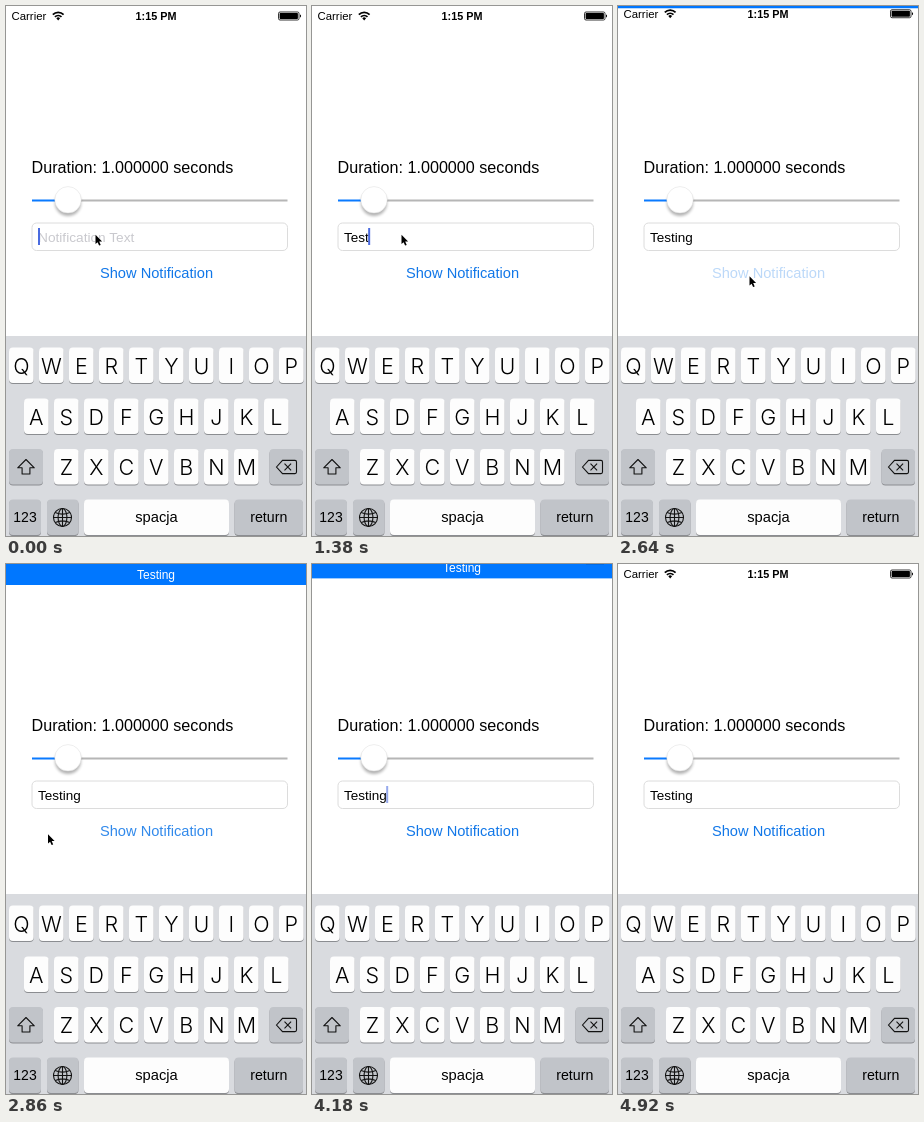
Write an HTML page that moves like this. It is 300 px wide and 530 px high and loops after 5020 ms.

```html
<!DOCTYPE html>
<html lang="en">
<head>
<meta charset="utf-8">
<title>Status bar notification</title>
<style>
  html, body { margin: 0; width: 100%; height: 100%; overflow: hidden; background: #fff; }
  svg { display: block; width: 300px; height: 530px; }
  text { font-family: "Liberation Sans", Arial, sans-serif; }
  .mid { text-anchor: middle; }
  .letter { font: 300 21.5px Inter, "Liberation Sans", sans-serif; }
  .line { fill: none; stroke: #111; stroke-width: 1.1; }
</style>
</head>
<body>
<svg viewBox="0 0 300 530">
  <defs>
    <filter id="soft" x="-50%" y="-50%" width="200%" height="200%"><feGaussianBlur stdDeviation="1.8"/></filter>
  </defs>

  <g id="banner">
    <rect width="300" height="21" fill="#0077ff"/>
    <text class="mid" x="150" y="15" font-size="12" fill="#fff">Testing</text>
  </g>

  <g id="status">
    <text x="5.5" y="14" font-size="11.4">Carrier</text>
    <g fill="none" stroke="#000" stroke-width="1.7">
      <path d="M46.8 8.6a7.6 7.6 0 0 1 10.8 0"/>
      <path d="M48.9 10.9a4.7 4.7 0 0 1 6.6 0"/>
    </g>
    <path d="M50.3 12.3a2.7 2.7 0 0 1 3.8 0L52.2 14.4z"/>
    <text class="mid" x="150" y="14" font-size="10.8" font-weight="700">1:15 PM</text>
    <rect x="272.5" y="6" width="20.5" height="8" rx="1.5" fill="none" stroke="#000" stroke-width=".8"/>
    <rect x="273.6" y="7.1" width="18.3" height="5.8" rx=".6"/>
    <path d="M294 8.5a1.6 1.6 0 0 1 0 3z"/>
  </g>

  <text x="25.5" y="166.5" font-size="16.15">Duration: 1.000000 seconds</text>

  <path d="M62 194.5H281.5" stroke="#b6b6b6" stroke-width="2"/>
  <path d="M26 194.5H62" stroke="#0a7aff" stroke-width="2"/>
  <circle cx="62" cy="197" r="13" opacity=".3" filter="url(#soft)"/>
  <circle cx="62" cy="193.8" r="13.2" fill="#fff" stroke="#ddd" stroke-width=".5"/>

  <rect x="26" y="217" width="255.5" height="27.5" rx="4.5" fill="#fff" stroke="#dcdcdc"/>
  <text id="hint" x="32" y="235.5" font-size="13.7" fill="#c9c9ce">Notification Text</text>
  <text id="typed" x="32" y="235.5" font-size="13.5"></text>
  <rect id="caret" y="222" width="2" height="17" fill="#4a6be0"/>

  <text id="button" class="mid" x="150.5" y="272" font-size="14.65" fill="#1177e8">Show Notification</text>

  <rect y="330" width="300" height="200" fill="#d9dbdf"/>
  <g id="keys"></g>

  <path class="line" d="M20 453.5l8.3 8.3h-4.4v6.2h-7.8v-6.2h-4.4z" stroke-linejoin="round"/>
  <path class="line" d="M270.5 461l6-6.6h12.5a1.5 1.5 0 0 1 1.5 1.5v10.2a1.5 1.5 0 0 1-1.5 1.5h-12.5zM278.5 457.7l6.6 6.6m0-6.6l-6.6 6.6"/>
  <g class="line" transform="translate(56.5 511.5)">
    <circle r="9"/>
    <ellipse rx="4.4" ry="9"/>
    <path d="M0-9V9M-9 0H9M-7.3-5Q0-1.8 7.3-5M-7.3 5Q0 1.8 7.3 5"/>
  </g>

  <path id="pointer" d="M0 0V9.3L2.1 7.4 3.6 10.8 5.2 10.1 3.7 6.8H6.6z" stroke="#fff" stroke-width=".8" paint-order="stroke"/>
</svg>

<script>
const LOOP = 5020, BAR = 21;
const $ = id => document.getElementById(id);
const ramp = (t, a, b) => Math.min(1, Math.max(0, (t - a) / (b - a)));
const ease = (t, a, b) => { const p = ramp(t, a, b); return p * p * (3 - 2 * p); };

function key(x, y, w, label = "", size = 0, dark = false) {
  const box = (dy, fill) =>
    `<rect x="${x}" y="${y + dy}" width="${w}" height="35.5" rx="4" fill="${fill}"/>`;
  const font = size ? `font-size="${size}"` : 'class="letter"';
  const base = y + (size ? 22.5 : 26);
  return box(1.1, "#8b8d91") + box(0, dark ? "#c1c4c9" : "#fdfdfd") +
    `<g class="mid"><text ${font} x="${x + w / 2}" y="${base}">${label}</text></g>`;
}
const row = (letters, x, y) => [...letters].map((c, i) => key(x + 30 * i, y, 24.7, c)).join("");

$("keys").innerHTML =
  row("QWERTYUIOP", 3, 341.5) + row("ASDFGHJKL", 18, 392.5) + row("ZXCVBNM", 48, 443) +
  key(3, 443, 34, "", 0, true) + key(263.5, 443, 33.5, "", 0, true) +
  key(3, 493.5, 32, "123", 14, true) + key(41, 493.5, 31.5, "", 0, true) +
  key(78, 493.5, 145, "spacja", 14.7) + key(228.5, 493.5, 68.5, "return", 14.2, true);

const typeTimes = [220, 500, 660, 800, 1400, 1560, 1700];
const path = [ // time, x, y
  [0, 89.5, 228.8], [1940, 89.5, 228.8], [2080, 152.5, 268.5], [2460, 131.5, 270.3],
  [2660, 131.5, 270.3], [2860, 42, 270.3], [3400, 42, 270.3], [3720, -12, 271], [LOOP, -12, 271]
];

function pointerAt(t) {
  const i = path.findIndex(p => p[0] > t);
  const [t0, x0, y0] = path[i - 1], [t1, x1, y1] = path[i];
  const p = ease(t, t0, t1);
  return `translate(${x0 + (x1 - x0) * p} ${y0 + (y1 - y0) * p})`;
}

function draw(now) {
  const t = now % LOOP;
  const count = typeTimes.filter(k => k <= t).length;
  $("typed").textContent = "Testing".slice(0, count);
  $("hint").style.display = count ? "none" : "";
  $("caret").setAttribute("x", count ? 31.4 + $("typed").getComputedTextLength() : 32);
  $("caret").style.opacity = 1 - ramp(t, 2460, 2600) + ramp(t, 3020, 3140)
    - ramp(t, 3560, 3720) + ramp(t, 4100, 4240) - ramp(t, 4700, 4920);

  $("button").style.opacity = t < 2500 ? 1 : .25 + .75 * ease(t, 2600, 2960);

  const shown = BAR * (ease(t, 2590, 2840) - ease(t, 4080, 4350));
  $("banner").setAttribute("transform", `translate(0 ${shown - BAR})`);
  $("status").setAttribute("transform", `translate(0 ${-shown})`);

  $("pointer").setAttribute("transform", pointerAt(t));
}

const start = performance.now();
function tick() {
  draw(performance.now() - start);
  requestAnimationFrame(tick);
}
tick();
</script>
</body>
</html>
```
